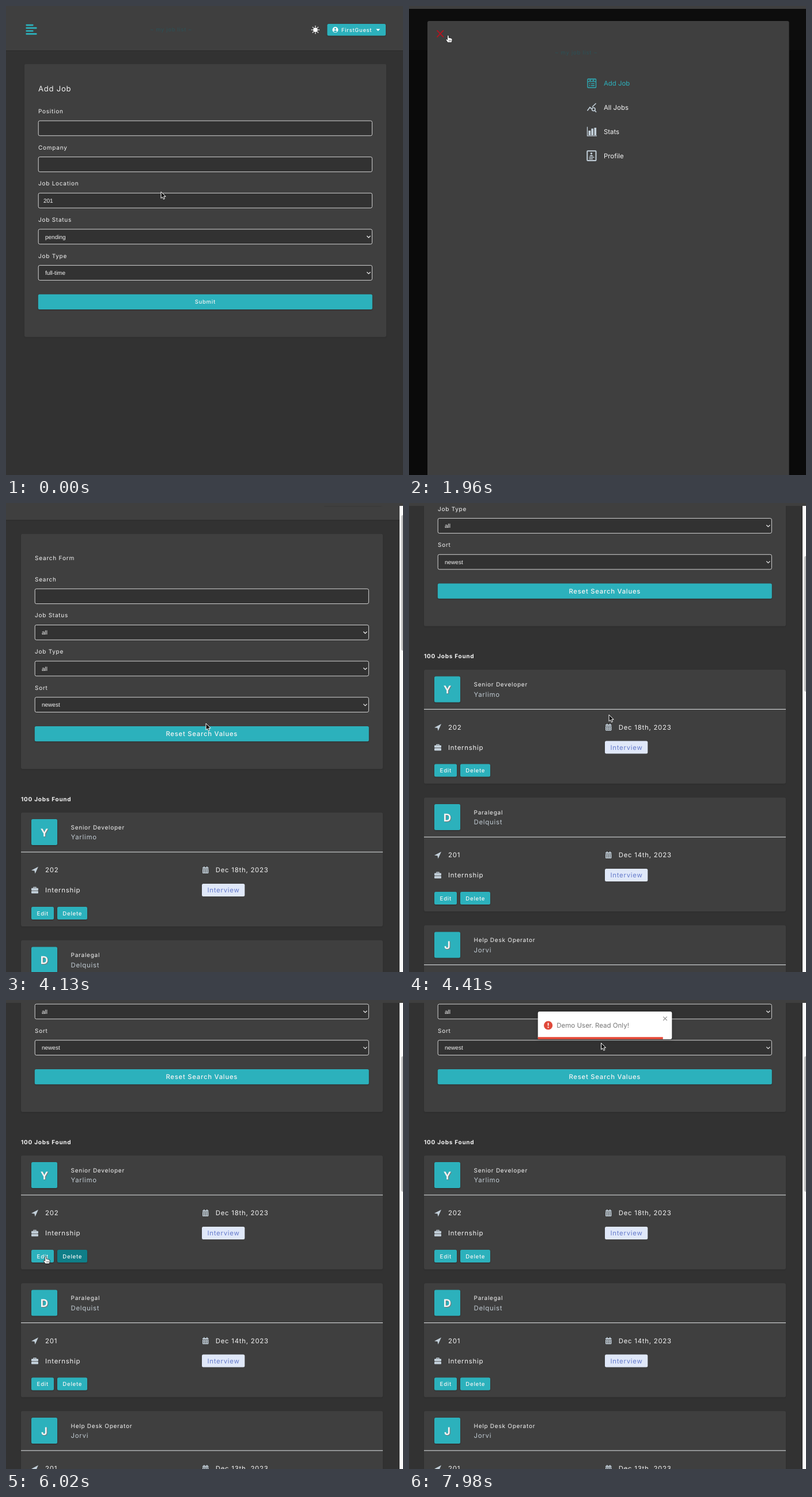
These frames come from a looping animation (689 by 813 pixels, 8 s). An HTML page:

```html
<!DOCTYPE html>
<html lang="en">
<head>
<meta charset="utf-8">
<title>Job tracker demo</title>
<style>
  html, body { margin: 0; width: 100%; height: 100%; overflow: hidden; background: #323232; }
  svg { display: block; width: 689px; height: 813px; }
  text { font-family: Inter, "Open Sans", sans-serif; fill: #f4f4f4; letter-spacing: .75px; white-space: pre; text-rendering: geometricPrecision; }
  .value { font-family: "Liberation Sans", Arial, sans-serif; font-size: 10px; letter-spacing: 0; }
  .nav, .toast text { letter-spacing: 0; }
  .card { fill: #3f3f3f; filter: drop-shadow(0 1px 1px rgba(0,0,0,.12)); }
  .btn { fill: #2cb1bc; filter: drop-shadow(0 1px 1px rgba(0,0,0,.3)); }
  .field { fill: #323232; stroke: #d4d4d4; stroke-width: 1; }
  .line { fill: none; stroke-width: 1.3; }
</style>
</head>
<body>
<svg id="stage" viewBox="0 0 689 813" xmlns="http://www.w3.org/2000/svg"></svg>
<script>
const TEAL = '#2cb1bc', ICON = '#c3d0da', LOOP = 8000, TICK = 70;

const rect = (x, y, w, h, attrs = '', r = 0) =>
  `<rect x="${x}" y="${y}" width="${w}" height="${h}" rx="${r}" ${attrs}/>`;
const text = (x, y, str, size = 10, attrs = '') =>
  `<text x="${x}" y="${y}" font-size="${size}" ${attrs}>${str}</text>`;
const path = (d, attrs = '') => `<path d="${d}" ${attrs}/>`;
const group = (body, attrs = '') => `<g ${attrs}>${body}</g>`;
const move = (x, y) => `transform="translate(${x} ${y})"`;
const MID = 'text-anchor="middle"';

function header() {
  const bars = [13, 19, 13, 19].map((w, i) => rect(34.5, 31.7 + i * 5.1, w, 2.7, `fill="${TEAL}"`, .8)).join('');
  let rays = '';
  for (let a = 0; a < 360; a += 45)
    rays += path('M0-5.1V-6.7', `stroke="#fff" stroke-width="1.2" stroke-linecap="round" transform="rotate(${a})"`);
  return rect(0, 0, 700, 77, 'fill="#3f3f3f"') + rect(0, 77, 700, 1, 'fill="#292929"') + bars +
    text(250, 44, '~ my job list ~', 9.3, 'style="fill:#2b5258"') +
    group('<circle r="3.9" fill="#fff"/>' + rays, move(537, 41.3)) +
    rect(557.5, 31, 101.5, 20.5, 'class="btn"', 2.5) +
    '<circle cx="571.5" cy="41.3" r="5" fill="#fff"/><circle cx="571.5" cy="39.6" r="1.6" fill="#2cb1bc"/>' +
    path('M568.4 43.8Q571.5 40.8 574.6 43.8Q571.5 47 568.4 43.8Z', `fill="${TEAL}"`) +
    text(582, 44.7, 'FirstGuest', 9.3, 'font-weight="500"') +
    path('M642.3 39.8H649.2L645.75 43.5Z', 'fill="#fff"');
}

// Rows are [label, value, isSelect]
function form(cardTop, title, titleSize, titleY, top, rows, button, buttonSize) {
  const step = 62.65, end = top + (rows.length - 1) * step + 50.2;
  const fields = rows.map(([label, value, select], i) => {
    const y = top + i * step;
    return text(56, y - 13, label) + rect(56.2, y, 579.2, 25.8, 'class="field"', 2.5) +
      text(select ? 68 : 65, y + 16.6, value, 10, 'class="value"') +
      (select ? path(`M626.3 ${y + 11.6}l3.1 3 3.1-3`, 'class="line" stroke="#e8e8e8"') : '');
  }).join('');
  return rect(32, cardTop, 628, end + 74 - cardTop, 'class="card"', 3) +
    text(56, titleY, title, titleSize) + fields +
    rect(55.8, end, 580, 26.3, 'class="btn"', 2.5) +
    text(345.8, end + 13 + buttonSize * .36, button, buttonSize, MID + ' font-weight="500"');
}

function job([title, company, place, date], i) {
  const arrow = path('M44 100.2L56 94 50.6 106 49.4 100.9Z', `fill="${ICON}"`);
  const briefcase = path('M48 131.2V129.6H52V131.2', `class="line" stroke="${ICON}"`) +
    rect(44, 131, 12, 4.2, `fill="${ICON}"`, 1) + rect(44, 135.9, 12, 4.4, `fill="${ICON}"`, 1);
  let calendar = rect(341, 95, 10.4, 10.4, `fill="${ICON}"`, 1) +
    rect(343, 93.6, 1.5, 2, `fill="${ICON}"`) + rect(348, 93.6, 1.5, 2, `fill="${ICON}"`) +
    rect(341, 97.1, 10.4, .8, 'fill="#3f3f3f"');
  for (let k = 0; k < 6; k++)
    calendar += rect(342.4 + k % 3 * 2.9, 99.2 + (k > 2) * 2.9, 1.7, 1.7, 'fill="#3f3f3f"');
  const button = (id, x, w, label) => rect(x, 163.5, w, 22, `class="btn" id="${id}${i}"`, 2.5) +
    text(x + w / 2 + .3, 178, label, 9.6, MID + ' font-weight="500"');
  return group(
    rect(26, 0, 628, 197.5, 'class="card"', 3) +
    rect(44, 11.5, 45, 45, 'class="btn"', 2.5) +
    text(66.8, 41, company[0], 18.5, MID + ' font-weight="700" style="text-shadow:1px 1px 1px #777"') +
    text(112.5, 29, title) +
    text(112.5, 46.6, company, 11.4, 'style="fill:#bfc9d1"') +
    rect(26, 68, 628, 1.1, 'fill="#d5d8da"') +
    arrow + text(68, 103.6, place, 11.4) + calendar + text(363.7, 103.6, date, 11.4) +
    briefcase + text(68, 138.7, 'Internship', 11.4) +
    rect(340, 123.5, 74.3, 22, 'fill="#e0e8f9"', 2.5) +
    text(377.5, 138.7, 'Interview', 11.4, MID + ' style="fill:#647acb"') +
    button('edit', 44, 39, 'Edit') + button('del', 89, 52, 'Delete'),
    move(0, 584 + i * 221.5));
}

function sidebar() {
  const line = (d, c = ICON) => path(d, `class="line" stroke="${c}"`);
  const item = (y, label, id = '') => text(338, y + 4, label, 11.4, `class="nav" ${id}`);
  const icons =
    rect(310, 126.5, 14.5, 15, `class="line" stroke="${TEAL}"`, 1) +
    line('M312.5 134.7h2M316 134.7h6M312.5 138h2M316 138h6M310 131.2H324.5M313 128l1.3 1.3 1.7-1.6M318.5 128l1.3 1.3 1.7-1.6', TEAL) +
    group(path('M309.5 181.5L314 175.5 316.6 178.4M318 175L324.5 168.7') +
      '<circle cx="320.3" cy="179" r="2.8"/>' + path('M322.3 181.2L325 184'),
      `id="chart" class="line" stroke="${ICON}" style="stroke-width:1.6"`) +
    line('M309.5 209.5V225.2H326') +
    [[311.5, 216], [316.3, 212.5], [321.4, 211]].map(([x, y]) => rect(x, y, 3.7, 224 - y, `fill="${ICON}"`)).join('') +
    rect(309.3, 251.3, 15.2, 16.6, `class="line" stroke="${ICON}" style="stroke-width:2"`, 1) +
    `<circle cx="316.5" cy="255.6" r="1.7" fill="${ICON}"/>` +
    path('M313 260.6Q316.5 255.8 320 260.6Z', `fill="${ICON}"`) + line('M312.5 262.4H321.5M312.5 265H319');
  return rect(0, 0, 689, 813, 'fill="#000" opacity=".8"') +
    rect(32, 26, 627.6, 800, 'fill="#3f3f3f"', 3) +
    path('M48.5 42.2L60 54M60 42.2L48.5 54', 'class="line" stroke="#b3141f" style="stroke-width:1.8"') +
    text(253, 84, '~ my job list ~', 9.5, 'style="fill:#2b5258"') +
    rect(308, 155, 75, 41.5, 'id="tap" fill="#c3b48c"') + icons +
    item(134, 'Add Job', `style="fill:${TEAL}"`) + item(176, 'All Jobs', 'id="all"') +
    item(217.5, 'Stats') + item(259.5, 'Profile');
}

function toast() {
  return rect(223.7, 20, 232.6, 48, 'fill="#fff" style="filter:drop-shadow(0 1px 3px rgba(0,0,0,.25))"', 3) +
    '<circle cx="241.6" cy="44" r="7.6" fill="#e0493a"/>' +
    rect(240.7, 39.6, 1.8, 5.3, 'fill="#fff"', .8) + '<circle cx="241.6" cy="47.4" r="1.1" fill="#fff"/>' +
    text(256.3, 48, 'Demo User. Read Only!', 11.5, 'style="fill:#757575"') +
    path('M441.2 28.9l6.6 6.6M447.8 28.9l-6.6 6.6', 'class="line" stroke="#999"') +
    rect(223.7, 64.2, 232.6, 3.8, 'id="bar" fill="#e74c3c"');
}

const arrowShape = path('M0 0V11.4L2.6 9 4.4 13 6.4 12.1 4.7 8.3H8.2Z',
  'fill="#111" stroke="#fff" stroke-width="1" stroke-linejoin="round"');
const handShape = path('M-1.3 1Q0-.8 1.2 1V4.6Q2.5 3.9 3.4 5 4.7 4.5 5.4 5.7 7 5.3 7.1 7V9.2Q6.8 11 5.8 12.6H-.8Q-2.3 10.2-3.9 8.2-4 6.5-2.4 7L-1.3 8.1Z',
  'fill="#fff" stroke="#111" stroke-width=".8" stroke-linejoin="round"') +
  path('M1.6 8V10.6M3.3 8V10.6M5 8V10.6', 'stroke="#222" stroke-width=".6"');

const stage = document.getElementById('stage');
stage.innerHTML =
  rect(0, 0, 689, 813, 'fill="#323232"') +
  group(header() + form(100.6, 'Add Job', 13.1, 148.4, 199, [
    ['Position', ''], ['Company', ''], ['Job Location', '201'],
    ['Job Status', 'pending', true], ['Job Type', 'full-time', true]], 'Submit', 9.5), 'id="add"') +
  group(header() + form(101, 'Search Form', 10.1, 146, 196.3, [
    ['Search', ''], ['Job Status', 'all', true], ['Job Type', 'all', true],
    ['Sort', 'newest', true]], 'Reset Search Values', 11.3) +
    group(text(26, 564.2, '100 Jobs Found', 10, 'font-weight="700"') + [
      ['Senior Developer', 'Yarlimo', '202', 'Dec 18th, 2023'],
      ['Paralegal', 'Delquist', '201', 'Dec 14th, 2023'],
      ['Help Desk Operator', 'Jorvi', '201', 'Dec 13th, 2023']].map(job).join(''), move(6, 0)), 'id="jobs"') +
  group(rect(683, 0, 6, 813, 'fill="#fbfbfb"') + rect(686, 7.3, 7, 235, 'id="thumb" fill="#c1c1c1"', 3), 'id="scroll"') +
  group(sidebar(), 'id="menu"') +
  '<ellipse id="load" cx="438" cy="825" rx="125" ry="16" fill="#303030"/>' +
  rect(0, 0, 689, 5, 'fill="#3f3f3f"') +
  group(toast(), 'id="toast" class="toast"') +
  group(arrowShape, 'id="arrow"') + group(handShape, 'id="hand"');

const el = Object.fromEntries([...stage.querySelectorAll('[id]')].map(e => [e.id, e]));

// Each track is a table of [time, value, ...]
const pointer = [[70, 269, 322], [840, 51, 40], [1050, 51, 40], [1330, 57.5, 46], [1890, 57.5, 46],
  [2520, 361, 179.5], [3500, 361, 179.5], [3920, 347, 382], [4130, 347, 382], [4410, 347, 367],
  [4760, 347, 367], [5530, 304, 456], [5760, 118, 450], [5950, 105, 447], [6020, 69, 444.5],
  [6300, 65, 446], [6400, 65, 446], [6600, 88, 438], [6900, 112, 447], [7210, 112, 447], [7910, 333.5, 74.5]];
const menuFade = [[1050, 0], [1120, .2], [1190, .6], [1260, .88], [1330, 1], [2730, 1],
  [2800, .93], [2870, .66], [2940, .37], [3010, .14], [3080, 0]];
const scrollTrack = [[4129, 0], [4130, 47.5], [4200, 130], [4270, 210], [4340, 268], [4410, 295], [4620, 295], [4970, 314.5]];
const editHover = [[6030, 0], [6300, 1], [6560, 1], [6830, 0]];
const delHover = [[5700, 0], [5880, 1], [6010, 1], [6300, 0], [6600, 0], [6870, 1], [7280, 1], [7560, 0]];
const drop = [[0, -2250], [420, 19], [525, -7.5], [630, 3.75], [700, 0]];
const handTimes = [[770, 2000], [2380, 3200], [5690, 7290]];

const linear = p => p, smooth = p => p * p * (3 - 2 * p), easeOut = p => 1 - (1 - p) ** 3;

function at(track, t, ease = linear) {
  const i = track.findIndex(k => k[0] > t);
  if (i === 0) return track[0].slice(1);
  if (i < 0) return track[track.length - 1].slice(1);
  const a = track[i - 1], b = track[i], p = ease((t - a[0]) / (b[0] - a[0]));
  return a.slice(1).map((v, k) => v + (b[k + 1] - v) * p);
}

const show = (e, on) => { e.style.display = on ? '' : 'none'; };
const shift = (e, x, y) => e.setAttribute('transform', `translate(${x} ${y})`);
const tint = h => `rgb(${[[44, 14], [177, 124], [188, 134]].map(([a, b]) => Math.round(a + (b - a) * h))})`;

function draw(time) {
  const t = Math.floor(time / TICK) * TICK;
  const listed = t >= 3220, [top] = at(scrollTrack, t);
  show(el.add, !listed);
  show(el.jobs, listed);
  show(el.scroll, listed);
  shift(el.jobs, -6, -top);
  shift(el.thumb, 0, top * .287);

  const [fade] = at(menuFade, t);
  show(el.menu, fade > 0);
  el.menu.style.opacity = fade;
  show(el.tap, t >= 2730);
  show(el.load, t >= 2870 && t < 3080);
  const hot = t >= 2380;
  el.all.style.fill = hot ? TEAL : '';
  el.chart.setAttribute('stroke', hot ? TEAL : ICON);

  el.edit0.style.fill = tint(at(editHover, t)[0]);
  el.del0.style.fill = tint(at(delHover, t)[0]);

  show(el.toast, t >= 7210);
  shift(el.toast, 0, at(drop, t - 6935, easeOut)[0]);
  el.bar.setAttribute('width', 232.6 * (1 - Math.max(0, t - 7645) / 5000));

  const [x, y] = at(pointer, t, smooth);
  const hand = handTimes.some(([a, b]) => t >= a && t < b);
  show(el.hand, hand);
  show(el.arrow, !hand);
  shift(hand ? el.hand : el.arrow, x, y);
}

const start = performance.now();
function loop() {
  draw((performance.now() - start) % LOOP);
  requestAnimationFrame(loop);
}
loop();
</script>
</body>
</html>
```
